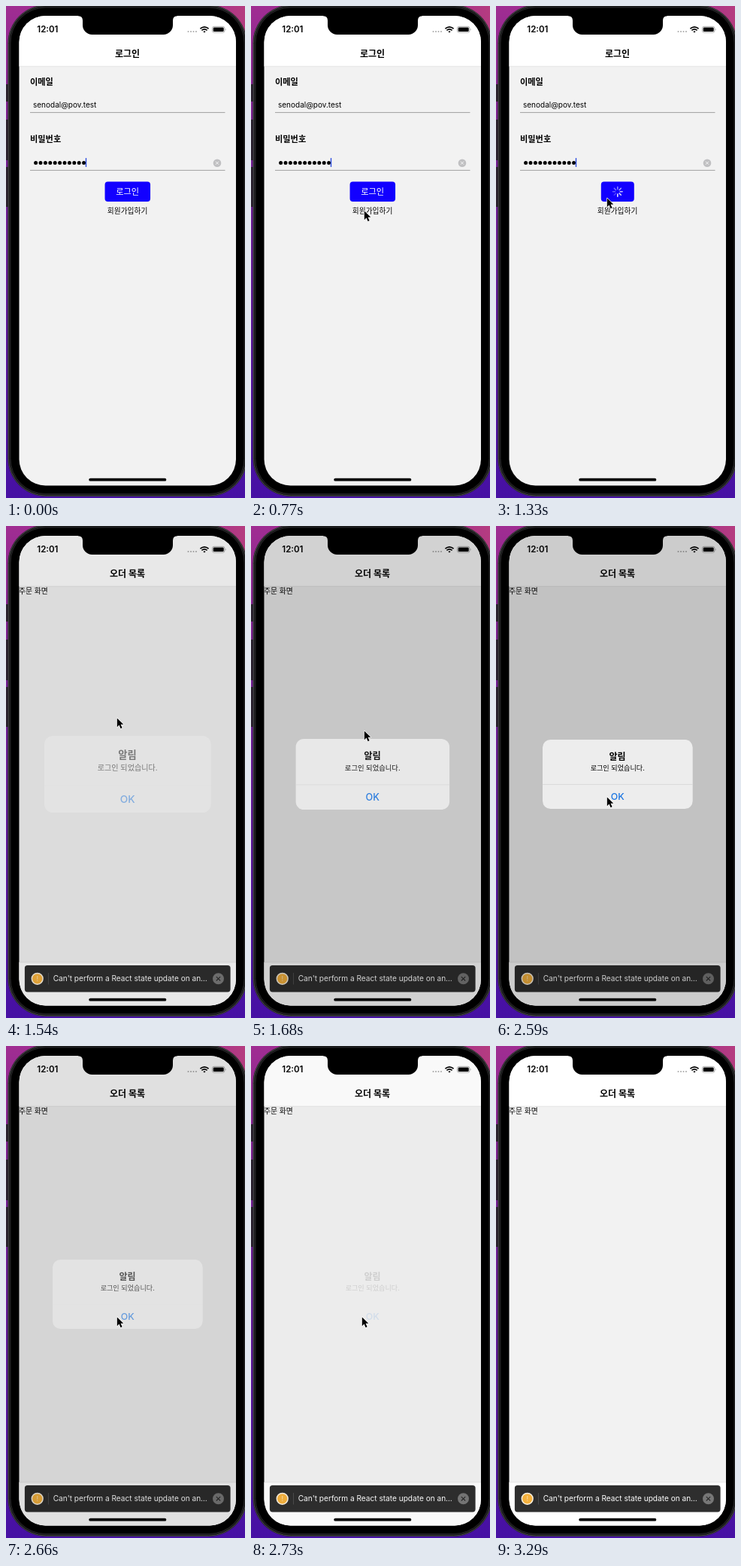
An HTML page for the animation above (4060 ms loop, 318 by 654 pixels).

```html
<!DOCTYPE html>
<html lang="ko">
<head>
<meta charset="utf-8">
<title>로그인</title>
<style>
  html, body { margin: 0; width: 100%; height: 100%; overflow: hidden; background: #5a189c; }
  svg { display: block; width: 318px; height: 654px; }
  text { font-family: Inter, "Noto Sans CJK KR", "Noto Sans CJK", sans-serif; font-size: 10px; }
  .mid { text-anchor: middle; }
  .title { font-size: 12px; font-weight: 600; }
  .label { font-size: 11.2px; font-weight: 700; }
</style>
</head>
<body>
<svg viewBox="0 0 318 654">
  <defs>
    <linearGradient id="wall" x2="0" y2="1">
      <stop offset="0" stop-color="#a02d92"/>
      <stop offset=".25" stop-color="#792392"/>
      <stop offset=".6" stop-color="#611c98"/>
      <stop offset="1" stop-color="#4610a4"/>
    </linearGradient>
    <linearGradient id="glow">
      <stop offset=".75" stop-color="#b53c80" stop-opacity="0"/>
      <stop offset="1" stop-color="#b53c80"/>
    </linearGradient>
    <clipPath id="screen"><rect x="17.5" y="13" width="288.5" height="624.5" rx="35"/></clipPath>
  </defs>

  <!-- Desktop and phone body -->
  <rect width="318" height="654" fill="url(#wall)"/>
  <rect width="318" height="80" fill="url(#glow)"/>
  <path d="M0 104h4v23h-4zM0 151h4v54h-4zM0 214h4v53h-4z" fill="#2b2230"/>
  <rect x="2.5" y="-1.5" width="318" height="653.5" rx="51" fill="#1c1c1d"/>
  <rect x="3.4" y="-.6" width="316.2" height="651.7" rx="50" fill="#19191a" stroke="#48484a"/>
  <rect x="6" y="2" width="311" height="646.5" rx="47" fill="#000" stroke="#2c2c2e" stroke-width=".8"/>

  <g clip-path="url(#screen)">
    <rect x="17" y="13" width="290" height="625" fill="#f2f2f2"/>
    <path d="M17 13h290v67H17z" fill="#fff"/>
    <path d="M17 80.2h290" stroke="#d8d8d8" stroke-width=".6"/>

    <g id="login">
      <text class="mid title" x="161.5" y="68">로그인</text>
      <text class="label" x="32" y="105">이메일</text>
      <text x="36" y="135.3">senodal@pov.test</text>
      <text class="label" x="32" y="181.3">비밀번호</text>
      <path d="M32 141.6h259.5M32 218.4h259.5" stroke="#8c8c8c" stroke-width=".8"/>
      <path d="M39.6 208.5h65" stroke="#000" stroke-width="5" stroke-linecap="round" stroke-dasharray="0 6.4"/>
      <rect id="caret" x="105.8" y="202" width="1.4" height="12" rx=".5" fill="#3050e0"/>
      <circle cx="281" cy="208.7" r="5.3" fill="#c0c0c2"/>
      <path d="M279 206.7l4 4m0-4l-4 4" stroke="#f5f5f5"/>
      <rect id="button" y="233.5" height="26.5" rx="4" fill="#1200ff"/>
      <text id="buttonText" class="mid" x="161.7" y="250.8" fill="#fff" style="font-size:11.2px">로그인</text>
      <g id="spinner" stroke="#fff" stroke-width="1.5" stroke-linecap="round"></g>
      <text class="mid" x="161.6" y="276" style="font-size:9.7px">회원가입하기</text>
    </g>

    <g id="orders">
      <text class="mid title" x="161.5" y="68">오더 목록</text>
      <text x="17" y="90" style="font-size:9.8px">주문 화면</text>
      <path d="M17 580h290v58H17z" fill="#fff"/>
      <path d="M17 580h290" stroke="#dcdcdc" stroke-width=".6"/>
      <g id="toast">
        <rect x="24.9" y="584" width="273.7" height="35.5" rx="3.7" fill="#2e2e2e"/>
        <circle cx="41.7" cy="601.8" r="7.4" fill="#f4b03c" stroke="#f8f0e2" stroke-width="1.5"/>
        <text class="mid" x="41.7" y="605.2" fill="#fbe3b8" style="font-size:9px">!</text>
        <path d="M56.5 594v15.5" stroke="#555" stroke-width=".8"/>
        <text x="62.7" y="605.3" fill="#fff" style="font-size:10.1px">Can't perform a React state update on an…</text>
        <circle cx="282.5" cy="601.8" r="7.5" fill="#777"/>
        <path d="M279.800 599.100l5.400 5.400m0-5.400l-5.400 5.400" stroke="#2a2a2a" stroke-width="1.1"/>
      </g>
    </g>

    <!-- Status bar -->
    <text x="41.3" y="35.2" style="font-size:11.5px;font-weight:600">12:01</text>
    <path d="M242.5 34h11" stroke="#aaa" stroke-width="2" stroke-linecap="round" stroke-dasharray="0 3.5"/>
    <g fill="none" stroke="#000" stroke-width="1.7">
      <path d="M258.4 30.200q5.600-4.800 11.200 0M260.400 32.400q3.600-3 7.200 0"/>
      <path d="M264 35.600l-1.600-1.700q1.600-1.200 3.200 0z" fill="#000" stroke="none"/>
    </g>
    <rect x="274.5" y="27.3" width="16.4" height="7.9" rx="2.3" fill="none" stroke="#999" stroke-width=".8"/>
    <rect x="275.7" y="28.5" width="14" height="5.5" rx="1.3"/>
    <path d="M291.9 29.8q1.500 1.400 0 2.900z" fill="#999"/>

    <rect id="dim" x="17" y="13" width="290" height="625"/>
    <g id="alert">
      <rect x="62" y="284" width="199.7" height="92" rx="10.5" fill="#ededed"/>
      <path id="divider" d="M62 343.6h199.7" stroke="#d2d2d2" stroke-width=".7"/>
      <text class="mid" x="161.5" y="310.8" style="font-size:12px;font-weight:600">알림</text>
      <text class="mid" x="161.7" y="325.3" style="font-size:9.1px">로그인 되었습니다.</text>
      <text class="mid" x="161.7" y="364.4" fill="#1874e2" style="font-size:12.3px;font-weight:500">OK</text>
    </g>
    <rect x="110.3" y="627.8" width="103" height="3.8" rx="1.9"/>
  </g>
  <path d="M96 12.5h132v.7q-6 0-6 6v6.300a12.500 12.500 0 0 1-12.500 12.500h-95a12.500 12.500 0 0 1-12.500-12.500v-6.300q0-6-6-6z"/>

  <g id="cursor">
    <path d="M0 0v14.300l3.300-3.100 2.500 5.700 2.500-1.100-2.500-5.500h4.600z" transform="translate(.8 1.400) scale(.82)"
          stroke="#fff" stroke-width="1.6" stroke-linejoin="round" paint-order="stroke"/>
  </g>
</svg>
<script>
const LOOP = 4060, STEP = 70;
const CLICK = 980, SWAP = 1470, TOAST = 1540, DISMISS = 2590;

// Key points: time, then values
const caretKeys = [[0, 1], [280, 0], [350, 0], [560, 1]];
const alertKeys = [[1400, 0], [1540, .45], [1610, .45], [1680, .88], [1820, 1], [DISMISS, 1], [2660, .6], [2730, .12], [2800, 0]];
const cursorKeys = [
  [420, 164, 590], [560, 157, 385], [770, 150, 271], [910, 147, 254], [1610, 147, 254],
  [1820, 156, 305], [1960, 158, 329], [2030, 158, 329], [2100, 157, 333],
  [2240, 151, 349], [2450, 147, 359], [2730, 147, 359],
  [2870, 151, 420], [3080, 162, 499], [3150, 162, 499], [3220, 162, 512]
];

const $ = id => document.getElementById(id);
const set = (id, attrs) => {
  for (const key in attrs) $(id).setAttribute(key, attrs[key]);
};
const show = (id, on) => set(id, { visibility: on ? 'inherit' : 'hidden' });

function track(keys, t) {
  const next = keys.findIndex(key => key[0] > t);
  if (next === 0) return keys[0].slice(1);
  if (next < 0) return keys.at(-1).slice(1);
  const a = keys[next - 1], b = keys[next];
  const part = (t - a[0]) / (b[0] - a[0]);
  return a.slice(1).map((v, i) => v + (b[i + 1] - v) * part);
}

for (let i = 0; i < 8; i++) {
  $('spinner').innerHTML += `<path d="M0-3.3V-6.4" transform="rotate(${i * 45})" opacity="${.25 + i * .1}"/>`;
}

function draw(now) {
  const t = Math.floor(now % LOOP / STEP) * STEP;
  const loggedIn = t >= SWAP;
  const loading = t >= CLICK && !loggedIn;
  show('login', !loggedIn);
  show('orders', loggedIn);
  show('toast', t >= TOAST);

  set('caret', { opacity: track(caretKeys, t)[0] });
  const width = loading ? 44 : 60.5;
  set('button', { x: 161.8 - width / 2, width });
  set('buttonText', { opacity: loading ? 0 : 1 });
  const turn = Math.min((t - CLICK) / STEP, 5) * 45;
  set('spinner', { opacity: loading ? 1 : 0, transform: `translate(161.8 246.8) rotate(${turn})` });

  const p = track(alertKeys, t)[0];
  const scale = t < DISMISS ? 1 + .2 * (1 - p) : 1;
  set('dim', { opacity: .2 * p });
  set('alert', { opacity: p, transform: `translate(161.8 330) scale(${scale}) translate(-161.8 -330)` });
  set('divider', { opacity: p ** 3 });

  show('cursor', t >= 420 && t < 3290);
  set('cursor', { transform: `translate(${track(cursorKeys, t)})` });
}

const start = performance.now();
function tick() {
  draw(performance.now() - start);
  requestAnimationFrame(tick);
}
tick();
</script>
</body>
</html>
```
